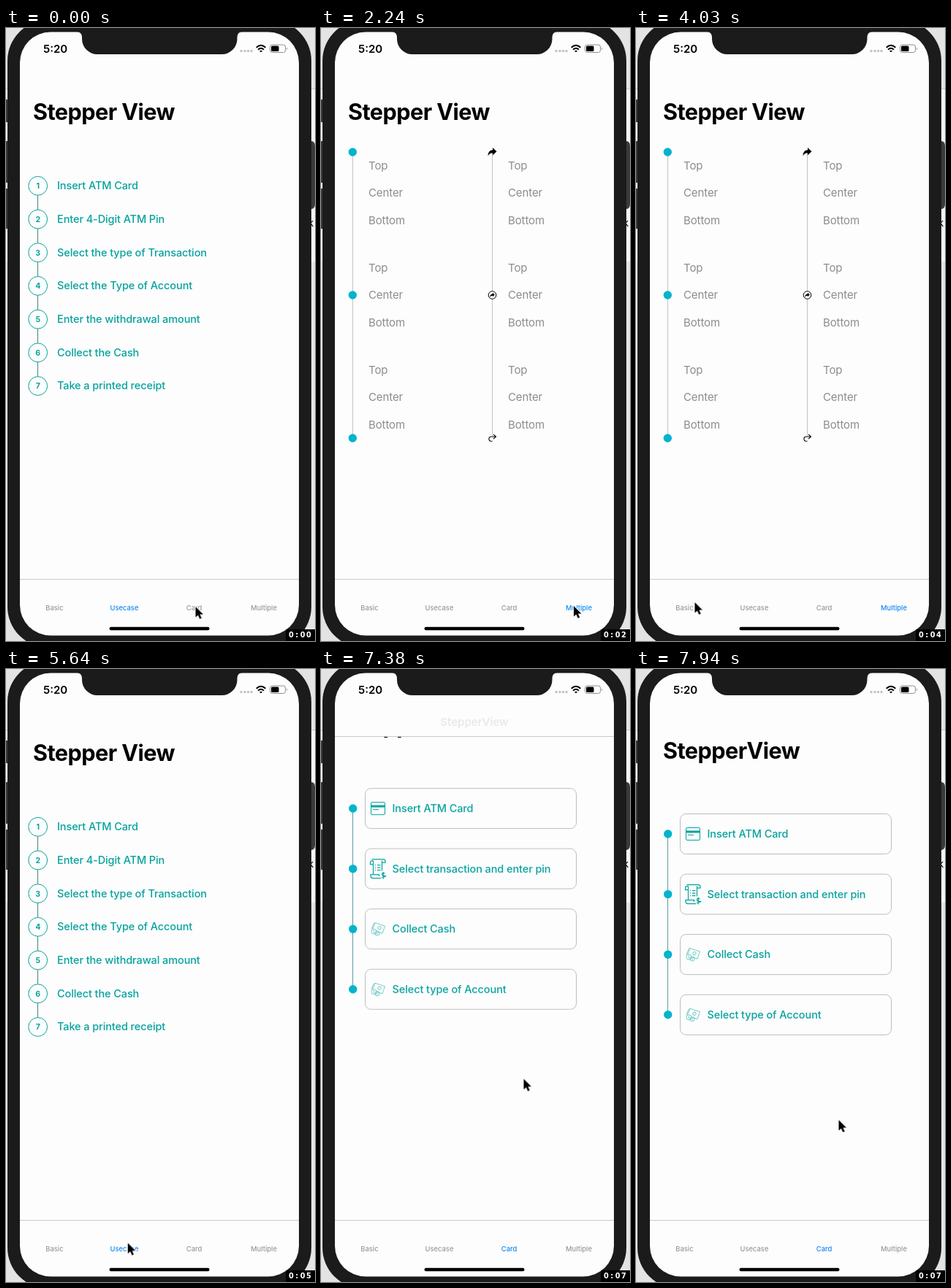
Write an HTML page that moves like this. It is 423 px wide and 840 px high and loops after 8 s.

```html
<!DOCTYPE html>
<html lang="en">
<head>
<meta charset="utf-8">
<title>Stepper View</title>
<style>
html, body { margin: 0; width: 100%; height: 100%; overflow: hidden; background: #e3e3e3; }
svg { display: block; font-family: Inter, Roboto, sans-serif; }
#stage { width: 100vw; height: 100vh; }

.title { font-size: 30.6px; font-weight: 700; letter-spacing: -.55px; }
.step { font-size: 14.5px; font-weight: 500; letter-spacing: -.1px; fill: #06a29e; }
.number { font-size: 10.5px; font-weight: 700; fill: #06a29e; text-anchor: middle; }
.cell { font-size: 15px; letter-spacing: -.1px; fill: #8c8c8c; }
.tab { font-size: 9.4px; font-weight: 500; text-anchor: middle; fill: currentColor; opacity: 1 !important; }
.clock { font: 700 9.8px "DejaVu Sans", sans-serif; fill: #fff; }
.teal { fill: none; stroke: #06a29e; }
.dot { fill: #00b4cc; }

.usecase, .card, .steps, .basic, .multi { animation: 8s step-end infinite; }
.usecase { animation-name: usecase; }
.card { animation-name: card; }
.steps { animation-name: steps; }
.basic { animation-name: basic; }
.multi { animation-name: multi; }
/* colour serves the tabs, opacity the pages */
@keyframes usecase {
  0%, 63.875% { opacity: 1; color: #1289f5; }
  4.75%, 80.875%, 100% { opacity: 0; color: #999; }
}
@keyframes card {
  0%, 28% { opacity: 0; color: #999; }
  4.75%, 80.875%, 100% { opacity: 1; color: #1289f5; }
}
@keyframes steps {
  0%, 63.875%, 100% { opacity: 0; }
  28% { opacity: 1; }
}
@keyframes basic {
  0%, 63.875%, 100% { color: #999; }
  53.375% { color: #1289f5; }
}
@keyframes multi {
  0%, 53.375%, 100% { opacity: 0; color: #999; }
  28% { opacity: 1; color: #1289f5; }
}

#scroll { animation: scroll 8s linear infinite; }
@keyframes scroll {
  0%, 87.5% { transform: translateY(0); }
  89% { transform: translateY(-30px); }
  90.5% { transform: translateY(-46px); }
  92.25% { transform: translateY(-38px); }
  93%, 94% { transform: translateY(-33px); }
  97% { transform: translateY(-13px); }
  99.25%, 100% { transform: translateY(-3px); }
}
#navline { animation: navline 8s step-end infinite; }
@keyframes navline {
  0%, 92.95%, 100% { opacity: 0; }
  89.4% { opacity: 1; }
}
#navtitle { font-size: 15px; font-weight: 600; text-anchor: middle; animation: navtitle 8s linear infinite; }
@keyframes navtitle {
  0%, 89%, 95%, 100% { opacity: 0; }
  90.5% { opacity: .45; }
  92.25% { opacity: .08; }
  94% { opacity: .04; }
}
#digits { animation: digits 8s steps(8) -20ms infinite; }
@keyframes digits { to { transform: translateY(-160px); } }

#cursor { animation: cursor 8s linear infinite; }
@keyframes cursor {
  0%, 18% { transform: translate(259.5px, 793px); }
  18.25% { transform: translate(271.5px, 793px); }
  21% { transform: translate(318px, 790px); }
  24.625%, 33.5% { transform: translate(346px, 792px); }
  33.875% { transform: translate(338px, 793px); }
  36% { transform: translate(205px, 802px); }
  38.125% { transform: translate(108.5px, 798px); }
  41% { transform: translate(86px, 784px); }
  43.125%, 44.4% { transform: translate(80px, 778px); }
  47.5% { transform: translate(83px, 783px); }
  50.375%, 56.25% { transform: translate(80.5px, 787px); }
  56.75% { transform: translate(95px, 788px); }
  58.875%, 70.1% { transform: translate(146px, 790px); }
  70.5% { transform: translate(166.5px, 786.5px); }
  74% { transform: translate(222px, 788px); }
  77.6%, 83.5% { transform: translate(258px, 792px); }
  83.875% { transform: translate(259px, 783px); }
  87.5% { transform: translate(278px, 625px); }
  90.5% { transform: translate(278px, 550px); }
  92.25% { transform: translate(277.5px, 561.5px); }
  93%, 94% { transform: translate(277.5px, 570px); }
  99.25%, 100% { transform: translate(277.5px, 618px); }
}
</style>
</head>
<body>
<svg id="stage" viewBox="0 0 423 840">
  <defs>
    <clipPath id="below-nav"><path d="M19 92H401V755H19z"/></clipPath>
    <g id="icon-card" class="teal">
      <rect x="-9.5" y="-8.5" width="19" height="17" rx="1.5"/>
      <path d="M-9.5 -3H9.5" stroke-width="3"/>
      <path d="M-7 1.5H1"/>
    </g>
    <g id="icon-receipt" class="teal" stroke-width="1.2">
      <path d="M-6.5 8V-10.5a2.5 2.5 0 0 0 -4 2V-6H-6.5M-8.5 -13H7a3 3 0 0 1 3 3V-8.5H5.5V3M5.5 -8.5V-11M-6.5 8H-10V10a3 3 0 0 0 3 3H4M-6.5 8H1.5V10.5"/>
      <path d="M-4 -5H-3M-1 -5H3.5M-4 -1.5H-3M-1 -1.5H3.5M-4 2H-3M-1 2H3.5"/>
      <path d="M9.5 6.5q-4 -2 -4 .8t4 2.5t-4.5 2.5M7.3 4.5V14"/>
    </g>
    <g id="icon-cash" class="teal" stroke-width=".7" opacity=".8">
      <path d="M-4 -8.5L9.5 -4L6 6L-1 3.5M-4 -8.5L-7.5 0M-4 -8.5L-6 -7L-9 0"/>
      <circle cx="2" cy="-1.5" r="2.2"/>
      <circle cx="-5.5" cy="3.5" r="3.5"/>
      <circle cx="-1" cy="6" r="3"/>
      <path d="M-5.5 1.5V5.5M-1 4.5V7.5"/>
    </g>
    <path id="arrow" d="M-5.5 5.5Q-5.5 -2.5 1 -2.7V-6L6.5 -.8L1 4.3V1.3Q-3 1 -5.5 5.5z"/>
  </defs>

  <!-- desktop behind the phone -->
  <path fill="#e3e3e3" d="M0 0H423V840H0z"/>
  <path fill="#f5f5f5" d="M0 84H423V320H0z"/>
  <path stroke="#c4c4c4" d="M0 83.5H423"/>
  <path fill="#3a3a3a" d="M0 98H5V129H0zM0 155H5V212H0zM0 220H5V275H0zM410 155H418Q423 155 423 162V241Q423 248 418 248H410z"/>
  <text x="414" y="272" font-size="13">k</text>

  <!-- phone -->
  <rect x="2" y="-11" width="416" height="860" rx="56" fill="#1b1b1b"/>
  <rect x="19" y="5.5" width="382" height="827" rx="42" fill="#fdfdfd"/>
  <path fill="#1b1b1b" d="M97 5A7 7 0 0 1 104 12V15A21 21 0 0 0 125 36H295.500A21 21 0 0 0 316.500 15V12A7 7 0 0 1 323.500 5z"/>
  <text x="51" y="33.7" font-size="15" font-weight="600">5:20</text>
  <g fill="#c2c2c2">
    <circle cx="322" cy="31.5" r="1.7"/><circle cx="327" cy="31.5" r="1.7"/>
    <circle cx="331.5" cy="31.5" r="1.7"/><circle cx="336" cy="31.5" r="1.7"/>
  </g>
  <g fill="none" stroke="#000" stroke-width="2">
    <path d="M342.7 26.8Q349 20.8 355.3 26.8M345 29.6Q349 25.8 353 29.6"/>
    <path d="M347.5 31.3H350.5L349 33z" fill="#000" stroke-width=".8"/>
  </g>
  <rect x="361.5" y="23" width="21" height="10.5" rx="3" fill="none" stroke="#8c8c8c"/>
  <rect x="363" y="24.5" width="10.5" height="7.5" rx="1.5"/>
  <path d="M384 26.5Q386 28.3 384 30z" fill="#8c8c8c"/>

  <g id="pages" clip-path="url(#below-nav)"></g>

  <g class="card">
    <path id="navline" d="M19 92.5H401" stroke="#c9c9c9"/>
    <text id="navtitle" x="210" y="77.5">StepperView</text>
  </g>

  <path d="M19 755.5H401" stroke="#c9c9c9"/>
  <text class="tab basic" x="66.5" y="797.5">Basic</text>
  <text class="tab usecase" x="162" y="797.5">Usecase</text>
  <text class="tab card" x="257.5" y="797.5">Card</text>
  <text class="tab multi" x="353" y="797.5">Multiple</text>
  <rect x="141.5" y="820.7" width="137" height="4.5" rx="2.2"/>

  <g id="cursor">
    <path d="M0 0V14.5L3.4 11.4L5.7 16.8L8.2 15.7L5.9 10.5H10.5z" stroke="#fff" stroke-width="2" paint-order="stroke"/>
  </g>

  <path d="M383 824H423V840H383z"/>
  <text class="clock" y="835" x="387 396.3 402.800">0:0</text>
  <svg x="410" y="824" width="13" height="16"><g id="digits" class="clock"></g></svg>
</svg>

<script>
const text = (cls, x, y, label) => `<text class="${cls}" x="${x}" y="${y}">${label}</text>`;
const line = (x, top, bottom, color) => `<path d="M${x} ${top}V${bottom}" stroke="${color}"/>`;
const dot = (x, y) => `<circle class="dot" cx="${x}" cy="${y}" r="5.7"/>`;
const use = (id, x, y) => `<use href="#${id}" x="${x}" y="${y}"/>`;
const page = (cls, ...parts) => `<g class="${cls}">${parts.flat().join("")}</g>`;
const heading = label => text("title", 37, 126, label);

const numberedSteps = [
  "Insert ATM Card", "Enter 4-Digit ATM Pin", "Select the type of Transaction",
  "Select the Type of Account", "Enter the withdrawal amount", "Collect the Cash",
  "Take a printed receipt"
].map((label, i) => {
  const y = 216.3 + 45.7 * i;
  return (i ? line(43.5, y - 32.7, y - 13, "#4a8080") : "") +
    `<circle class="teal" cx="43.7" cy="${y}" r="12.9"/>` +
    text("number", 43.7, y + 3.8, i + 1) + text("step", 70, y + 4.9, label);
});

const cards = [
  ["Insert ATM Card", "icon-card"], ["Select transaction and enter pin", "icon-receipt"],
  ["Collect Cash", "icon-cash"], ["Select type of Account", "icon-cash"]
].map(([label, icon], i) => {
  const y = 229 + 82.6 * i;
  return dot(43.7, y) +
    `<rect x="60.5" y="${y - 27.5}" width="289" height="55" rx="8" fill="none" stroke="#bcbcbc"/>` +
    use(icon, 78, y) + text("step", 97.5, y + 5, label);
});

const column = x => [0, 1, 2].map(group =>
  ["Top", "Center", "Bottom"].map((label, i) =>
    text("cell", x, 194 + 140 * group + 37.4 * i, label)).join(""));

const redoIcons = use("arrow", 234, 170) +
  `<circle cx="234.5" cy="366" r="5.3" fill="#fdfdfd" stroke="#000"/>
   <use href="#arrow" transform="translate(234.3 366) scale(.55)"/>
   <path d="M231 559H240V566H228V559z" fill="#fdfdfd"/>
   <path d="M239 560H233a3.1 3.1 0 0 0 0 6.2H234.5M236 556.8L239.5 560L236 563.2" fill="none" stroke="#000" stroke-width="1.1"/>`;

document.getElementById("pages").innerHTML =
  page("usecase", heading("Stepper View"), numberedSteps) +
  page("card", `<g id="scroll">`, heading("StepperView"), line(43.5, 229, 476.8, "#5a9ca0"), cards, "</g>") +
  page("steps", heading("Stepper View"), line(43.5, 170, 562, "#c2c2c2"),
    [170, 366, 562].map(y => dot(43.3, y)), column(65)) +
  page("multi", line(234.5, 170, 562, "#c2c2c2"), redoIcons, column(256));

document.getElementById("digits").innerHTML =
  [...Array(8).keys()].map(n => text("", 1, 11 + 20 * n, n)).join("");
</script>
</body>
</html>
```
